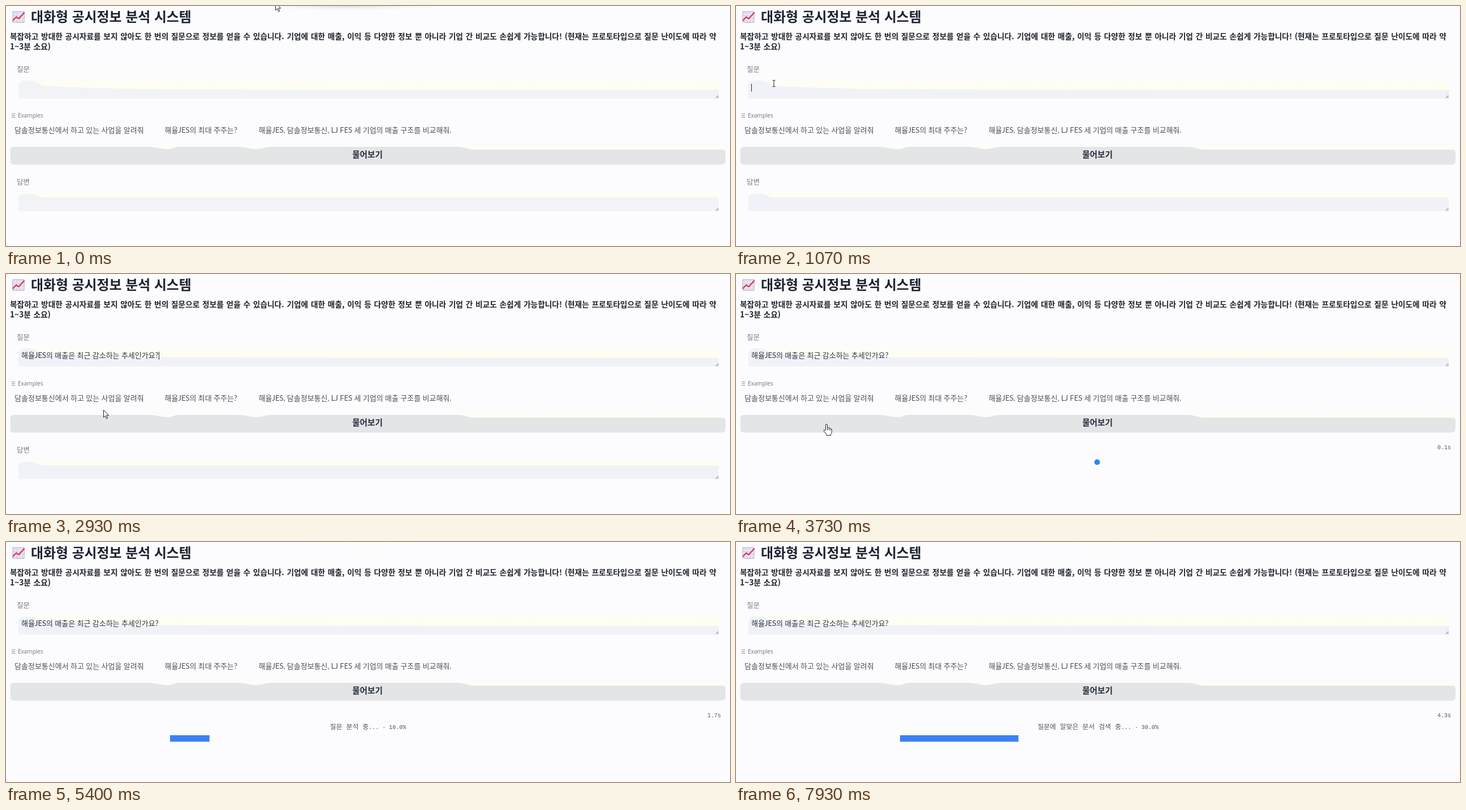
Recreate the animation shown at these times as an HTML page. Size 1280 by 426 pixels, loop 8 s.

```html
<!DOCTYPE html>
<html lang="ko">
<head>
<meta charset="utf-8">
<title>대화형 공시정보 분석 시스템</title>
<style>
  html, body { margin: 0; width: 100%; height: 100%; overflow: hidden; background: #fcfcfe; }
  svg { display: block; width: 1280px; height: 426px; }
  text { font-family: "Noto Sans CJK KR", "Noto Sans CJK JP", "Noto Sans CJK", sans-serif; white-space: pre; }
  .title { font-size: 23.9px; font-weight: 700; fill: #1c2330; }
  .intro { font-size: 13.7px; font-weight: 700; fill: #1d222c; word-spacing: .9px; }
  .label { font-size: 12.5px; fill: #777b80; }
  .item { font-family: Lato, "Noto Sans CJK KR", "Noto Sans CJK JP", "Noto Sans CJK", sans-serif; font-size: 13px; fill: #4a5059; }
  .ask { font-size: 14.6px; font-weight: 700; fill: #232b38; text-anchor: middle; }
  .hint { font-family: "Open Sans", sans-serif; font-size: 10px; fill: #70747a; }
  .mono { font-family: "Liberation Mono", "Noto Sans CJK KR", "Noto Sans CJK JP", monospace; font-size: 10px; fill: #50545a; }
  .middle { text-anchor: middle; }
  .end { text-anchor: end; }
  #step { font-size: 11.8px; }
  .panel { fill: none; stroke: #fcfcf9; }
  .field { fill: #f2f3f6; }
  .focused .field { fill: #f0f2f8; }
  .glow { fill: url(#glow); }
  .grip { stroke: #6d7074; fill: none; }
  .pointer path { fill: #fff; stroke: #22252b; stroke-linejoin: round; }
</style>
</head>
<body>
<svg id="stage" viewBox="0 0 1280 426">
  <defs>
    <linearGradient id="glow" x2="0" y2="1">
      <stop offset="0" stop-color="#fffff4" stop-opacity=".4"/>
      <stop offset="1" stop-color="#fefeeb"/>
    </linearGradient>
    <radialGradient id="shade" cx=".4" cy="0" r=".6">
      <stop offset="0" stop-color="#dedee2"/>
      <stop offset="1" stop-color="#fcfcfe" stop-opacity="0"/>
    </radialGradient>
    <radialGradient id="tint" cy="0" r=".6">
      <stop offset="0" stop-color="#fefeee"/>
      <stop offset="1" stop-color="#fcfcfe" stop-opacity="0"/>
    </radialGradient>
  </defs>

  <rect x="490" width="295" height="18" fill="url(#tint)"/>
  <rect id="shadow" x="480" width="310" height="16" fill="url(#shade)"/>

  <g id="chart">
    <rect x="11.5" y="9.5" width="21" height="20" rx="1.5" fill="#d9d6ea" stroke="#c5c1dc"/>
    <path d="M16.7 10V29M22 10V29M27.3 10V29M12 14.5H32M12 19.5H32M12 24.5H32" stroke="#f4f2fb"/>
    <path d="M12 26L18 19.5L22.5 22.5L32.5 11.5" fill="none" stroke="#df3352" stroke-width="2.2" stroke-linejoin="round"/>
  </g>
  <text class="title" x="44" y="27.5">대화형 공시정보 분석 시스템</text>
  <text class="intro" x="7" y="59.3">복잡하고 방대한 공시자료를 보지 않아도 한 번의 질문으로 정보를 얻을 수 있습니다. 기업에 대한 매출, 이익 등 다양한 정보 뿐 아니라 기업 간 비교도 손쉽게 가능합니다! (현재는 프로토타입으로 질문 난이도에 따라 약</text>
  <text class="intro" x="7" y="77.3">1~3분 소요)</text>

  <rect id="askPanel" class="panel" x="7.5" y="95.5" width="1264" height="78" rx="6"/>
  <text class="label" x="19" y="116.5">질문</text>
  <rect class="glow" x="22" y="128" width="1238" height="23"/>
  <path id="askField" class="field"/>
  <text id="question" class="item" x="27" y="149.3" style="fill:#2d3440">해율JES의 매출은 최근 감소하는 추세인가요?</text>
  <rect id="caret" width="1" height="14" fill="#22262e"/>

  <g id="lower">
    <path class="grip" d="M1254.5 163.5l5-5M1257.5 163.5l2.5-2.5"/>
    <path d="M10 191.5h6M10 194.5h6M10 197.5h6" stroke="#8a8d91"/>
    <text class="hint" x="21" y="198">Examples</text>
    <g class="panel">
      <rect x="7.5" y="207.5" width="247" height="26" rx="6"/>
      <rect x="272.5" y="207.5" width="148" height="26" rx="6"/>
      <rect x="438.5" y="207.5" width="366" height="26" rx="6"/>
    </g>
    <text class="item" x="15" y="224.8">담솔정보통신에서 하고 있는 사업을 알려줘</text>
    <text class="item" x="280.5" y="224.8">해율JES의 최대 주주는?</text>
    <text class="item" x="446.5" y="224.8">해율JES, 담솔정보통신, LJ FES 세 기업의 매출 구조를 비교해줘.</text>

    <rect class="glow" x="255" y="248" width="1017" height="12" rx="3"/>
    <path fill="#e4e5e7" d="M14 250H250C265 250 272 254 285 254S295 250 306 250H410C425 250 431 254 442 254S456 250 470 250H798C812 250 815 255 830 255H1266Q1272 255 1272 260V275Q1272 281.5 1265 281.5H14Q7.5 281.5 7.5 275V256Q7.5 250 14 250Z"/>
    <text class="ask" x="639" y="269">물어보기</text>

    <rect class="panel" x="7.5" y="295.5" width="1264" height="78" rx="6"/>
    <g id="answer">
      <text class="label" x="19" y="316.5">답변</text>
      <rect class="glow" x="22" y="330" width="1238" height="11"/>
      <path class="field" d="M22 361V338C26 333 32 333 41 333C55 333 55 340 70 340H1260V361Q1260 364 1257 364H25Q22 364 22 361Z"/>
      <path class="grip" d="M1254.5 363.5l5-5M1257.5 363.5l2.5-2.5"/>
    </g>
    <g id="status">
      <text id="timer" class="mono end" x="1264" y="311"></text>
      <circle id="loader" r="5" fill="#2f86f0"/>
      <g id="progress">
        <text class="mono middle" x="640" y="331.5"><tspan id="step"></tspan><tspan id="percent"></tspan></text>
        <rect x="289.5" y="342.5" width="700" height="12" fill="none" stroke="#fcfcf9"/>
        <rect id="bar" x="290" y="343" height="11.5" fill="#3a81f7"/>
      </g>
    </g>
  </g>

  <g id="pointer" class="pointer">
    <path id="arrow" d="M.5 .5V13.5L3.5 10.8L5.7 15.8L7.8 14.9L5.6 10H9.7Z"/>
    <path id="beam" style="fill:none" d="M-2.5 -5.5H-.5Q0 -5.5 0 -4.5V4.5Q0 5.5 -.5 5.5H-2.5M2.5 -5.5H.5Q0 -5.5 0 -4.5M0 4.5Q0 5.5 .5 5.5H2.5"/>
    <path id="hand" d="M-1.5 11V2Q-1.5 .5 0 .5T1.5 2V7.5Q1.8 6.2 3.2 6.5T4.5 8Q5 7 6.2 7.4T7.3 9Q9.3 8.3 9.3 10.5V14Q9.3 17 7.5 18.5V20.5H0V18.5L-4.5 13Q-5.5 11.5 -4.3 10.8T-1.5 12.5M1.5 7.5V11.5M4.5 8V11.5M7.3 9V11.5"/>
  </g>
</svg>
<script>
  const LOOP = 8000, STEP = 1000 / 15;
  const el = {};
  document.querySelectorAll('[id]').forEach(n => el[n.id] = n);

  const show = (node, on) => node.style.display = on ? '' : 'none';
  const clamp = v => Math.max(0, Math.min(1, v));
  const smooth = v => v * v * (3 - 2 * v);

  // time, x, y of the pointer's hot spot
  const route = [
    [0, 476, -6], [467, 122, 116], [870, 66, 139], [1070, 67, 137.5],
    [2000, 67, 137.5], [2200, 190, 272], [2467, 190, 272], [2667, 172, 241],
    [3133, 172, 241], [3467, 160, 266], [4600, 160, 266], [5130, 60, 60], [5330, 45, -20]
  ];
  const kinds = [[600, 'arrow'], [2130, 'beam'], [2600, 'hand'], [3330, 'arrow'], [4730, 'hand'], [LOOP, 'arrow']];

  function pointerAt(t) {
    const i = route.findIndex(p => p[0] > t);
    if (i < 0) return route[route.length - 1].slice(1);
    const [t0, x0, y0] = route[i - 1], [t1, x1, y1] = route[i];
    const k = smooth((t - t0) / (t1 - t0));
    return [x0 + (x1 - x0) * k, y0 + (y1 - y0) * k];
  }

  function fieldPath(bottom) {
    return `M22 ${bottom - 3}V138C26 132 30 132 40 132C56 132 57 141 70 142C110 144 180 147 260 147.5` +
      `C400 149 900 149 1260 149V${bottom - 3}Q1260 ${bottom} 1257 ${bottom}H25Q22 ${bottom} 22 ${bottom - 3}Z`;
  }

  function draw(t) {
    const typed = t >= 1320;
    const tall = t >= 1860 && t < 2920;
    const busy = t >= 3720;
    const working = t >= 4520;
    const searching = t >= 6260;
    const shift = tall ? 15 : 0;

    el.shadow.style.opacity = 1 - clamp(t / 250);
    el.stage.classList.toggle('focused', t >= 920);

    el.askField.setAttribute('d', fieldPath(164 + shift));
    el.askPanel.setAttribute('height', 78 + shift);
    el.lower.setAttribute('transform', `translate(0 ${shift})`);
    show(el.question, typed);
    show(el.caret, t >= 920 && t < 3460);
    const end = 27 + (typed ? el.question.getComputedTextLength() : 0);
    el.caret.setAttribute('x', tall ? 27 : Math.round(end));
    el.caret.setAttribute('y', tall ? 154 : 138);

    show(el.answer, !busy);
    show(el.status, busy);
    show(el.loader, !working);
    show(el.progress, working);
    if (busy) {
      el.timer.textContent = (Math.floor((t - 3628) / 100) / 10).toFixed(1) + 's';
      const swing = Math.sin((t - 3733) / 1000 * Math.PI * 2);
      el.loader.setAttribute('cx', 638.5 + swing * 1.5);
      el.loader.setAttribute('cy', 334 - swing);
      el.step.textContent = searching ? '질문에 알맞은 문서 검색 중' : '질문 분석 중';
      el.percent.textContent = `... · ${searching ? 30 : 10}.0%`;
      const k = clamp((t - 6230) / 400);
      const part = .1 + .2 * (1 - (1 - k) ** 3);
      el.bar.setAttribute('width', 698 * part);
    }

    const [x, y] = pointerAt(t);
    const kind = kinds.find(k => t < k[0])[1];
    el.pointer.setAttribute('transform', `translate(${x} ${y})`);
    for (const name of ['arrow', 'beam', 'hand']) show(el[name], name === kind);
  }

  function tick() {
    const t = performance.now() % LOOP;
    draw(Math.floor((t + 4) / STEP) % 120 * STEP);
    requestAnimationFrame(tick);
  }
  tick();
</script>
</body>
</html>
```
